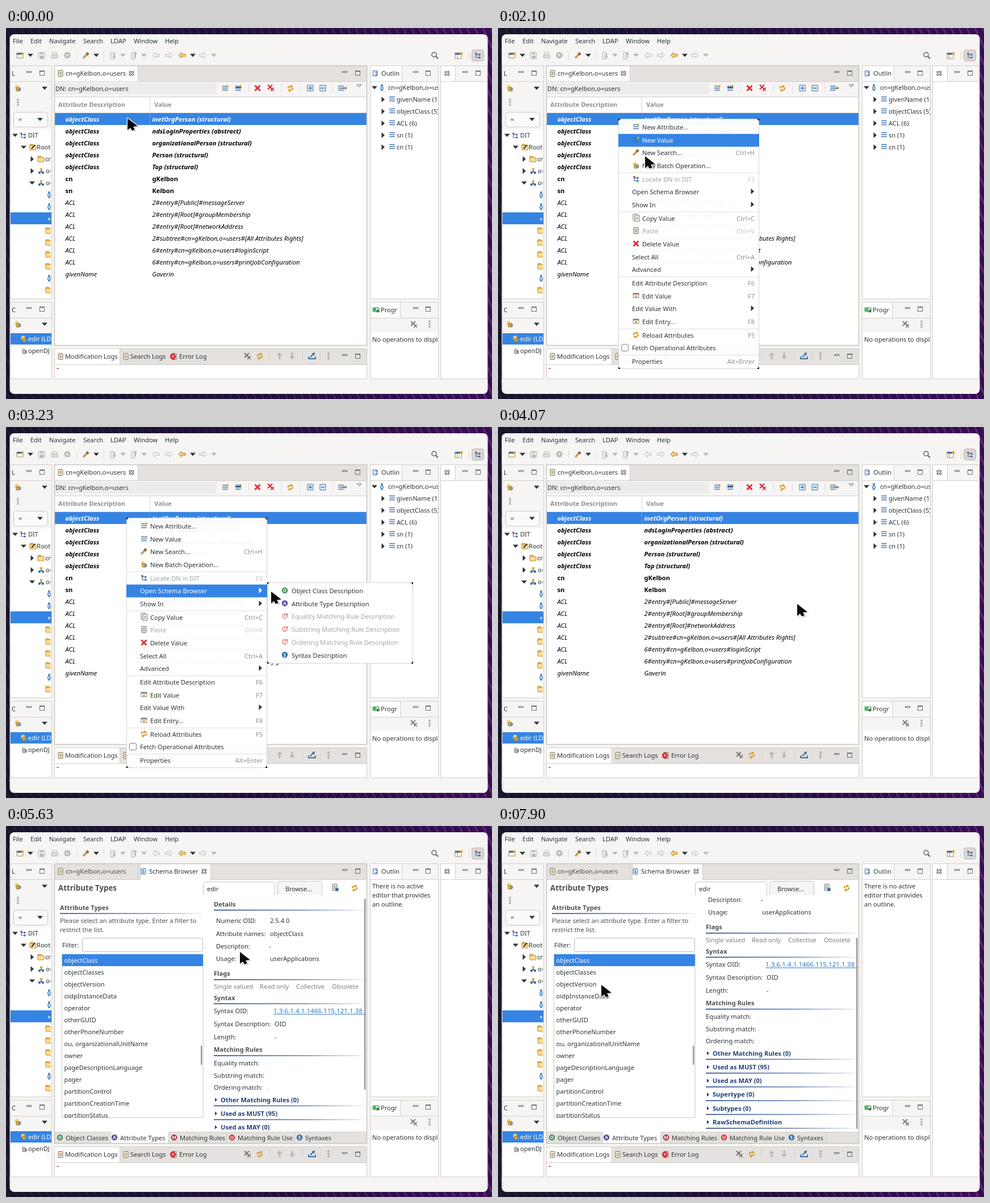
These frames come from a looping animation (856x654 px, 8 s). An HTML page with a canvas:

```html
<!DOCTYPE html>
<html lang="en">
<head>
<meta charset="utf-8">
<title>Directory browser</title>
<style>
html, body { margin: 0; width: 100%; height: 100%; overflow: hidden; background: #17102a; }
canvas { display: block; width: 856px; height: 654px; }
</style>
</head>
<body>
<canvas id="stage"></canvas>
<script>
const W = 856, H = 654, LOOP = 8000;
const cv = document.getElementById('stage'), g = cv.getContext('2d');
const dpr = window.devicePixelRatio || 1;
cv.width = W * dpr;
cv.height = H * dpr;

const INK = '#2e3436', DIM = '#a3a5a5', BLUE = '#3584e4', BG = '#f6f5f4', STRIP = '#e4e1de', LINE = '#d2cec9';
const NAVY = '#1f3f77', GOLD = '#e0a526', ICON = '#3a6ea5', RED = '#d9303c', GREY = '#b9b7b5';
const USER = 'Kelbon', DN = 'cn=g' + USER + ',o=users';

// ---- primitives ----
function rect(x, y, w, h, c) { g.fillStyle = c; g.fillRect(x, y, w, h); }
function frame(x, y, w, h, c = LINE, lw = 1) {
  g.strokeStyle = c; g.lineWidth = lw; g.strokeRect(x + .5, y + .5, w - 1, h - 1);
}
function box(x, y, w, h, r, fill, stroke) {
  g.beginPath(); g.roundRect(x, y, w, h, r);
  if (fill) { g.fillStyle = fill; g.fill(); }
  if (stroke) { g.strokeStyle = stroke; g.lineWidth = 1; g.stroke(); }
}
function path(p, x, y) {
  g.beginPath();
  for (let i = 0; i < p.length; i += 2) g.lineTo(x + p[i], y + p[i + 1]);
}
function poly(x, y, p, c) { path(p, x, y); g.closePath(); g.fillStyle = c; g.fill(); }
function line(x, y, p, c, lw = 1.2) { path(p, x, y); g.strokeStyle = c; g.lineWidth = lw; g.stroke(); }
function disc(x, y, r, c) { g.beginPath(); g.arc(x, y, r, 0, 7); g.fillStyle = c; g.fill(); }
function text(s, x, y, c = INK, style = '', size = 11.1) {
  g.font = `${style} ${size}px "Noto Sans", "Open Sans", sans-serif`;
  g.fillStyle = c;
  g.fillText(s, x, y + 4);
}
function textEnd(s, x, y, c) { g.textAlign = 'right'; text(s, x, y, c); g.textAlign = 'left'; }
function clip(x, y, w, h, draw) {
  g.save(); g.beginPath(); g.rect(x, y, w, h); g.clip(); draw(); g.restore();
}

// ---- icons, placed by their centre ----
const triR = (x, y, c = INK) => poly(x, y, [-2.5, -5, 3, 0, -2.5, 5], c);
const triD = (x, y, c = INK) => poly(x, y, [-5, -2.5, 5, -2.5, 0, 3], c);
const dots = (x, y) => { for (let i = -1; i < 2; i++) { disc(x, y + i * 4.5, 1.7, '#8b8987'); disc(x, y + i * 4.5, .8, '#fff'); } };
function minMax(x, y, x2) {
  frame(x - 4, y - 3, 9, 3, '#6d6f70');
  frame(x2 - 4, y - 4, 9, 9, '#6d6f70');
  rect(x2 - 4, y - 4, 9, 2, '#6d6f70');
}
function cross(x, y, c, r = 4.5, lw = 3) {
  line(x, y, [-r, -r, r, r], c, lw); line(x, y, [r, -r, -r, r], c, lw);
}
function closeX(x, y) { cross(x, y, '#4a4d4e', 3.6, 3.6); cross(x, y, '#fff', 3, 1.5); }
function crosses(x, y, c) { cross(x - 1, y - 1, c, 4, 2.3); cross(x + 3, y + 3, c, 2.8, 1.8); }
function folder(x, y) {
  box(x - 5, y - 5, 6, 4, 1, '#f0c060', '#c08a2a');
  box(x - 5, y - 3, 11, 8, 1, '#fbdc94', '#c08a2a');
}
function person(x, y) {
  box(x - 2.5, y - 2, 5, 6, 2, '#a9cdec', '#4a80b0');
  line(x, y, [-1, 3, -1, 6], '#4a80b0', 1.5); line(x, y, [1, 3, 1, 6], '#4a80b0', 1.5);
  disc(x, y - 4, 2, '#4a80b0');
}
function org(x, y) {
  line(x, y, [0, -2, 0, 1, -3, 3], INK); line(x, y, [0, 1, 3, 3], INK);
  disc(x, y - 3, 2.2, GOLD); disc(x - 3, y + 3, 2.2, ICON); disc(x + 3, y + 3, 2.2, ICON);
}
function bars(x, y, star) {
  for (let i = -1; i < 2; i++) rect(x - 5, y + i * 3.5 - .7, 10, 1.4, ICON);
  if (star) disc(x + 4, y - 3.5, 2, GOLD);
}
function refresh(x, y) {
  line(x, y, [-4, 1, -4, -2, 1, -3], '#c98e18', 1.7); poly(x, y, [0, -6, 5, -3, 0, 0], GOLD);
  line(x, y, [4, -1, 4, 2, -1, 4], '#c98e18', 1.7); poly(x, y, [0, 1, -5, 4, 0, 7], GOLD);
}
function arrow(x, y, d, c, fill) {
  const p = [-6 * d, 0, -1 * d, -5, -1 * d, -2, 6 * d, -2, 6 * d, 2, -1 * d, 2, -1 * d, 5];
  poly(x, y, p, fill); path(p, x, y); g.closePath(); g.strokeStyle = c; g.lineWidth = 1; g.stroke();
}
function torch(x, y) { line(x, y, [-5, 5, 2, -2], '#cf9848', 3.5); line(x, y, [1, -1, 4, -4], '#8b6b4a', 5); }
function badge(x, y, c, s) {
  disc(x, y, 5.2, c);
  g.textAlign = 'center'; text(s, x, y - .9, '#fff', 'bold', 8); g.textAlign = 'left';
}
function page(x, y, c = '#f3ead0') { box(x - 4, y - 5.5, 8, 11, 1, c, '#77715c'); for (let i = -2; i < 4; i += 2) line(x, y, [-2, i, 2, i], '#77715c', .8); }
function grid(x, y) { box(x - 5, y - 4, 10, 8, 0, '#fff', '#85807a'); rect(x - 5, y - 4, 10, 2.5, '#8a8580'); rect(x - 2, y, 4, 3, GOLD); }
function plusBox(x, y, plus) {
  box(x - 5, y - 5, 10, 10, 0, '#e4eefa', ICON); line(x, y, [-3, 0, 3, 0], ICON, 1.5);
  if (plus) line(x, y, [0, -3, 0, 3], ICON, 1.5);
}
function link(x, y) { disc(x - 2, y - 2, 3.5, '#f2ce72'); box(x - 3, y - 1, 7, 6, 1, '#e8b43c', '#8a6a20'); disc(x + 3, y + 2, 2.5, '#6b92bb'); }
function network(x, y, c = ICON) { disc(x - 3, y - 3, 1.8, RED); disc(x + 3, y - 1, 1.8, c); disc(x + 3, y + 4, 1.8, c); line(x, y, [-3, -3, -3, 4, 3, 4], c); line(x, y, [-3, -1, 3, -1], c); }

// ---- motion ----
// keys: [time, value...]; monotone cubic, so holds stay still
function track(keys, t, k = 1) {
  const n = keys.length;
  if (t <= keys[0][0]) return keys[0][k];
  if (t >= keys[n - 1][0]) return keys[n - 1][k];
  let i = 0;
  while (t >= keys[i + 1][0]) i++;
  const rate = j => j < 0 || j > n - 2 ? 0 : (keys[j + 1][k] - keys[j][k]) / (keys[j + 1][0] - keys[j][0]);
  const slope = j => { const a = rate(j - 1), b = rate(j); return a * b <= 0 ? 0 : 2 * a * b / (a + b); };
  const h = keys[i + 1][0] - keys[i][0], u = (t - keys[i][0]) / h, v = 1 - u;
  return keys[i][k] * (1 + 2 * u) * v * v + h * slope(i) * u * v * v
    + keys[i + 1][k] * u * u * (3 - 2 * u) - h * slope(i + 1) * u * u * v;
}
// last value whose time has come
function step(keys, t) {
  let v = keys[0][1];
  for (const [at, val] of keys) if (t >= at) v = val;
  return v;
}
const POINTER = [[1670, 214, 159], [2100, 259, 226], [2470, 313, 284], [2600, 313, 290], [3070, 313, 290],
  [3230, 467, 290], [3530, 527, 312], [4980, 527, 312], [5630, 412, 222], [5730, 324, 238], [6030, 296, 246],
  [6230, 296, 246], [6770, 508, 328], [7030, 508, 393], [7130, 508, 393], [7730, 182, 280]];
const SCROLL = [[6500, 0], [6770, 52], [6990, 82]];
const MENU_FADE = [[0, 0], [1130, .35], [1200, .75], [1270, 1], [3930, .65], [4000, .3], [4070, 0]];
const SUB_FADE = [[0, 0], [2500, .25], [2540, .5], [2590, .75], [2630, .97], [2770, 1], [3930, .65], [4000, .3], [4070, 0]];
const MENU_ROW = [[0, -1], [1800, 0], [1950, 1], [2115, 2], [2220, 3], [2370, 5]];
const SUB_ROW = [[0, -1], [3260, 0], [3400, 1]];
const BROWSER_AT = 4930;

// ---- window ----
function wallpaper() {
  const bg = g.createLinearGradient(0, 0, W, 0);
  bg.addColorStop(0, '#151428'); bg.addColorStop(.5, '#1e1038'); bg.addColorStop(1, '#340f50');
  rect(0, 0, W, H, bg);
  const ray = g.createLinearGradient(0, 0, W, 0);
  ray.addColorStop(0, '#211c36'); ray.addColorStop(.5, '#32184f'); ray.addColorStop(1, '#662080');
  for (let i = -30; i < 80; i++) line(i * 14, 0, [0, 0, 300, H], ray, 3);
}
function panel(x, y, w, h, tab, body, strip = BG) {
  rect(x, y, w, h, BG);
  rect(x, y, w, 28, strip);
  if (tab) rect(x, y, tab, 28, '#fff');
  if (tab) rect(x + tab, y, 1, 28, LINE);
  rect(x, body, w, y + h - body, '#fff');
  rect(x, y + 28, w, 1, LINE);
  frame(x, y, w, h);
}
function topBars() {
  [['File', 12], ['Edit', 43], ['Navigate', 76], ['Search', 136], ['LDAP', 184], ['Window', 225], ['Help', 280]]
    .forEach(([s, x]) => text(s, x, 23));
  box(19, 44, 11, 9, 1, '#fdf4d8', '#a08a55'); rect(19, 44, 11, 3, ICON); disc(29, 45, 2.2, GOLD);
  [43, 159].forEach(x => triD(x, 48));
  [206, 243, 366].forEach(x => triD(x, 48, GREY));
  triD(329, 48);
  box(57, 43, 11, 11, 1, '#eceae8', GREY); rect(60, 49, 6, 5, GREY); rect(60, 43, 5, 3, GREY);
  box(80, 47, 11, 6, 1, '#dedcda', GREY); box(82, 43, 7, 4, 0, '#f8f8f8', GREY);
  for (let a = 0; a < 8; a++) line(108, 48, [0, 0, 6 * Math.cos(a * .785), 6 * Math.sin(a * .785)], GREY, 2.5);
  disc(108, 48, 4, GREY); disc(108, 48, 2, BG);
  torch(141, 48);
  for (const [x, d] of [[188, 1], [225, -1]]) {
    box(x - 4, 43, 6, 12, 1, '#eceae8', GREY);
    line(x + 3, 48, [0, -4, 0, 4], GREY, 2); poly(x + 3, 48, [-3, 2 * d, 3, 2 * d, 0, 6 * d], GREY);
  }
  arrow(264, 48, 1, GREY, BG); arrow(287, 48, -1, GREY, BG);
  arrow(310, 48, 1, '#b98113', '#f7d27c'); arrow(347, 48, -1, GREY, BG);
  [124, 172, 815].forEach(x => rect(x, 41, 1, 15, '#dedad6'));
  g.beginPath(); g.arc(754, 47, 4, 0, 7); g.strokeStyle = '#5a5d5e'; g.lineWidth = 1.5; g.stroke();
  line(757, 50, [0, 0, 4, 4], '#5a5d5e', 2);
  box(791, 44, 11, 10, 0, '#fff', '#a08a55'); rect(791, 44, 11, 3, ICON); rect(795, 47, 1, 7, '#a08a55'); disc(802, 45, 2.5, GOLD);
  box(820.5, 38.5, 21, 20, 4, '#dad6d2', '#bfb8b1'); network(831, 48);
}
function leftSide() {
  panel(7, 66, 74, 412, 0, 179);
  text('L', 10, 80); minMax(40, 79, 63);
  link(21, 106); triD(68, 106); dots(21, 131);
  box(13.5, 148.5, 60, 26, 4, '#fbfafa', '#cdc7c2'); text('=', 22, 161); triD(60, 161);
  rect(8, 325, 72, 21, BLUE);
  clip(8, 179, 71, 297, () => {
    triD(16, 189); network(30, 189); text('DIT', 39, 189);
    triD(31, 210); folder(47, 210); line(47, 210, [-2, 3, 4, -4], INK, 2); text('Root', 54, 210);
    triR(46, 231); folder(61, 231); text('cn=', 69, 231);
    triR(46, 252); org(62, 252); text('o=', 70, 252);
    triD(46, 273); org(62, 273); text('o=', 70, 273);
    [294, 315, 336, 441].forEach(y => person(76, y));
    [357, 378, 399, 420, 462].forEach(y => folder(75, y));
  });
  panel(7, 483, 74, 136, 0, 536);
  text('C', 10, 497); minMax(40, 495, 63);
  link(21, 522); triD(68, 522);
  rect(8, 538, 72, 20, BLUE);
  clip(8, 536, 72, 80, () => {
    link(32, 548); text('edir (LDAP)', 39, 548, '#fff');
    disc(31, 567, 3, '#d5d3d0'); box(29, 568, 7, 6, 1, '#c5c3c0', '#77777a'); disc(35, 571, 2, '#8c8a88');
    text('openDJ', 39, 569);
  });
}
function rightSide(browsing) {
  panel(641, 66, 121, 412, 56, 95);
  box(646.5, 75.5, 7, 9, 0, '#eaf2fb', ICON); line(650, 80, [0, -2, 5, -2], ICON); line(650, 80, [0, 2, 5, 2], ICON);
  text('Outlin', 661, 80); minMax(721, 79, 743);
  if (browsing) {
    ['There is no active', 'editor that provides', 'an outline.'].forEach((s, i) => text(s, 645, 106 + i * 16));
  } else clip(642, 95, 119, 380, () => {
    triD(649, 105); person(662, 105); text(DN, 673, 105);
    ['givenName (1)', 'objectClass (5)', 'ACL (6)', 'sn (1)', 'cn (1)'].forEach((s, i) => {
      const y = 126 + i * 21;
      triR(664, y); bars(680, y - 1); text(s, 688, y);
    });
  });
  panel(765, 66, 83, 553, 26, 95);
  closeX(777, 80); minMax(808, 79, 831);
  panel(641, 483, 121, 136, 53, 536);
  box(646, 493, 11, 7, 1, '#d5efd8', '#2f8a46'); rect(647, 494, 5, 5, '#4cb265'); disc(655, 499, 2.5, '#3b7a4b');
  text('Progr', 660, 497); minMax(721, 495, 743);
  crosses(718, 522, '#85837f'); dots(746, 522);
  clip(642, 540, 119, 20, () => text('No operations to display', 645, 549));
}
function logs() {
  panel(85, 565, 551, 54, 115, 593, STRIP);
  page(96, 579); text('Modification Logs', 104, 579);
  page(211, 579); text('Search Logs', 219, 579);
  page(296, 579); badge(294, 579, RED, '×'); text('Error Log', 305, 579);
  crosses(425, 578, '#7d7b78'); refresh(447, 578);
  line(482, 578, [0, 6, 0, -3], GREY, 3); poly(482, 578, [-5, -1, 5, -1, 0, -6], GREY);
  line(504, 578, [0, -6, 0, 3], GREY, 3); poly(504, 578, [-5, 1, 5, 1, 0, 6], GREY);
  line(539, 578, [-6, 1, -6, 5, 6, 5, 6, 1], ICON, 1.8); line(539, 578, [-3, 2, 3, -4], ICON, 2); poly(539, 578, [0, -5, 5, -6, 4, 0], ICON);
  [464, 522, 553].forEach(x => rect(x, 571, 1, 14, '#d3cfcb'));
  dots(568, 578); minMax(596, 578, 619);
  text('-', 89, 600, RED, 'bold', 13);
}

// ---- entry editor ----
const ATTRS = [
  ...['inetOrgPerson (structural)', 'ndsLoginProperties (abstract)', 'organizationalPerson (structural)', 'Person (structural)', 'Top (structural)']
    .map(v => ['objectClass', v, 'italic bold']),
  ['cn', 'g' + USER, 'bold'], ['sn', USER, 'bold'],
  ...['2#entry#[Public]#messageServer', '2#entry#[Root]#groupMembership', '2#entry#[Root]#networkAddress',
    `2#subtree#${DN}#[All Attributes Rights]`, `6#entry#${DN}#loginScript`, `6#entry#${DN}#printJobConfiguration`]
    .map(v => ['ACL', v, 'italic']),
  ['givenName', 'Gaverin', 'italic']];
function entryEditor() {
  panel(85, 66, 551, 494, 147, 121, STRIP);
  page(96, 80); text(DN, 105, 80); closeX(221, 80);
  minMax(596, 79, 619);
  rect(86, 97, 285, 20, '#eeecea'); text('DN: ' + DN, 87, 107);
  bars(386, 106, 1); bars(409, 106, 1); rect(404, 104, 10, 2, '#1d4f8c');
  cross(443, 106, RED); crosses(466, 105, RED); refresh(501, 106);
  plusBox(536, 106, true); plusBox(558, 106);
  bars(590, 106); line(594, 106, [-2, 0, 5, 0], INK); poly(598, 106, [-1, -3, 3, 0, -1, 3], '#b07a2a');
  [427, 485, 518, 575].forEach(x => rect(x, 99, 1, 14, '#dedad6'));
  path([-4, -2, 4, -2, 0, 2], 622, 102); g.closePath(); g.strokeStyle = '#6d6f70'; g.lineWidth = 1; g.stroke();
  rect(86, 121, 549, 1, LINE); rect(86, 149, 549, 1, '#dedad6'); rect(253, 122, 1, 28, '#dedad6');
  text('Attribute Description', 92, 135, '#8d8f8f', 'bold'); text('Value', 261, 135, '#8d8f8f', 'bold');
  rect(86, 150, 549, 21, BLUE);
  rect(253, 150, 1, 21, '#5b9bea');
  ATTRS.forEach(([a, v, style], i) => {
    const y = 160.5 + i * 21, c = i ? '#000' : '#fff';
    text(a, 104.5, y, c, style); text(v, 257.5, y, c, style);
  });
  frame(85, 66, 551, 494, '#c9c4bf', 1.5);
}

// ---- schema browser ----
const TYPES = ['objectClass', 'objectClasses', 'objectVersion', 'oidpInstanceData', 'operator', 'otherGUID', 'otherPhoneNumber',
  'ou, organizationalUnitName', 'owner', 'pageDescriptionLanguage', 'pager', 'partitionControl', 'partitionCreationTime', 'partitionStatus'];
const PAGES = [['O', 'Object Classes', 95, '#3b8a55'], ['A', 'Attribute Types', 191, '#5a4a9c'], ['M', 'Matching Rules', 296, '#b02438'],
  ['U', 'Matching Rule Use', 398, '#d9303c'], ['S', 'Syntaxes', 517, '#2f6fae']];
function rule(x, y, w) {
  const c = g.createLinearGradient(x, 0, x + w, 0);
  c.addColorStop(0, '#24467f'); c.addColorStop(.6, '#6d88b5'); c.addColorStop(1, '#eef1f6');
  rect(x, y, w, 1.6, c);
}
function heading(s, x, y, w) { text(s, x, y, '#4c4f52', 'bold'); rule(x, y + 10, w); }
function details() {
  heading('Details', 366, 137.5, 265);
  [['Numeric OID:', 370, 167, '2.5.4.0', 465], ['Attribute names:', 370, 190, 'objectClass', 465], ['Descripton:', 370, 212, '-', 463],
    ['Usage:', 370, 234, 'userApplications', 465], ['Syntax OID:', 366, 326, '', 0], ['Syntax Description:', 366, 349, 'OID', 473],
    ['Length:', 366, 372, '-', 473]].forEach(([s, x, y, v, vx]) => { text(s, x, y); text(v, vx, y); });
  heading('Flags', 366, 260, 265);
  [['Single valued', 366], ['Read only', 447], ['Collective', 511], ['Obsolete', 574]].forEach(([s, x]) => text(s, x, 283, '#7d8081'));
  heading('Syntax', 366, 302.5, 265);
  text('1.3.6.1.4.1.1466.115.121.1.38', 471, 326, '#2a76c6', '', 11.6); rect(471, 331.5, 163, 1, '#2a76c6');
  heading('Matching Rules', 366, 394, 265);
  ['Equality', 'Substring', 'Ordering'].forEach((s, i) => {
    text(s + ' match:', 366, 418 + i * 21.7); text('-', 459, 418 + i * 21.7, '#c4c4c4');
  });
  ['Other Matching Rules (0)', 'Used as MUST (95)', 'Used as MAY (0)', 'Supertype (0)', 'Subtypes (0)', 'RawSchemaDefinition']
    .forEach((s, i) => {
      const y = 482.5 + i * 24.3;
      poly(369, y, [-1, -3.5, 3, 0, -1, 3.5], NAVY);
      text(s, 378, y, NAVY, 'bold'); rule(366, y + 10, 265);
    });
}
function schemaBrowser(scroll) {
  panel(85, 66, 551, 494, 0, 94, STRIP);
  rect(232, 67, 1, 27, LINE);
  page(96, 80); text(DN, 105, 80, '#4a4d4e');
  rect(237, 67, 123, 28, '#fff'); rect(236, 67, 1, 27, LINE); rect(360, 67, 1, 27, LINE);
  box(238, 75, 8, 10, 1, '#e8f0fa', ICON); text('S', 239.5, 79, ICON, 'bold', 8.5);
  text('Schema Browser', 252, 80); closeX(349, 80); minMax(596, 79, 619);

  text('Attribute Types', 92, 110, '#4c4f52', 'bold', 13.3);
  clip(340, 95, 294, 27, () => {
    box(347.5, 98.5, 126, 27, 4, '#fff', '#c8c2bc'); text('edir', 354, 111);
    box(478.5, 97.5, 78, 28, 4, BG, '#c8c2bc'); text('Browse...', 492, 111);
  });
  page(579, 108, '#dfeaf7'); disc(583, 112, 3, ICON); refresh(614, 109);

  heading('Attribute Types', 95, 143.5, 251);
  text('Please select an attribute type. Enter a filter to', 95, 167, '#4c4f52');
  text('restrict the list.', 95, 182.5, '#4c4f52');
  text('Filter:', 99, 209.5); box(134.5, 197.5, 212, 24, 3, '#fff', '#bfb8b1');
  frame(98, 226, 249.5, 288.5, '#cbc6c1');
  clip(98, 225, 250, 289, () => {
    rect(99, 226, 248, 21, BLUE);
    TYPES.forEach((s, i) => text(s, 102.5, 237 + i * 21, i ? INK : '#fff'));
  });
  box(343, 387, 2.5, 34, 1, '#9c9a98');

  clip(360, 125, 275, 413, () => {
    g.save(); g.translate(0, -scroll); details(); g.restore();
    box(631, 128 + scroll * 69 / 82, 2.5, 337, 1, '#98979a');
  });

  rect(86, 539, 549, 20, STRIP); rect(86, 539, 549, 1, LINE);
  rect(184, 539, 102, 20, '#fff');
  [184, 286, 388, 508, 578].forEach(x => rect(x, 540, 1, 19, LINE));
  PAGES.forEach(([k, s, x, c]) => { badge(x, 549, c, k); text(s, x + 10, 549.5); });
  frame(85, 66, 551, 494, '#c9c4bf', 1.5);
}

// ---- menus: [y, label, key or '>', icon, disabled] ----
const MENU = [
  [175, 'New Attribute...', '', (x, y) => bars(x, y, 1)], [198, 'New Value', '', (x, y) => bars(x, y, 1)],
  [220, 'New Search...', 'Ctrl+H', torch], [243, 'New Batch Operation...', '', link],
  [266.5, 'Locate DN in DIT', 'F3', network, 1], [289, 'Open Schema Browser', '>'], [312, 'Show In', '>'],
  [335.5, 'Copy Value', 'Ctrl+C', (x, y) => { page(x - 1, y - 1, '#fff'); page(x + 2, y + 1, '#fff'); }],
  [358, 'Paste', 'Ctrl+V', (x, y) => page(x, y, '#e5e3e0'), 1], [381, 'Delete Value', '', (x, y) => cross(x, y, RED)],
  [403.5, 'Select All', 'Ctrl+A'], [426, 'Advanced', '>'], [450, 'Edit Attribute Description', 'F6'],
  [472.5, 'Edit Value', 'F7', grid], [495, 'Edit Value With', '>'], [518, 'Edit Entry...', 'F8', grid],
  [541.5, 'Reload Attributes', 'F5', refresh], [564, 'Fetch Operational Attributes', ''], [587.5, 'Properties', 'Alt+Enter']];
const SUBMENU = [['Object Class', 'O', '#3b8a55'], ['Attribute Type', 'A', '#5a4a9c'], ['Equality Matching Rule', 'M'],
  ['Substring Matching Rule', 'M'], ['Ordering Matching Rule', 'M'], ['Syntax', 'S', '#2f6fae']];
function popup(x, y, w, h) {
  const k = 4;
  for (const cx of [x, x + w - k]) for (const cy of [y, y + h - k]) rect(cx, cy, k, k, '#000');
  box(x + .5, y + .5, w - 1, h - 1, 5, 'rgba(255,255,255,.965)', '#d8d4d0');
}
function menu(alpha, active) {
  g.globalAlpha = alpha;
  popup(212, 160, 248, 441);
  [254.5, 323.5, 438, 530, 576].forEach(y => rect(213, y, 246, 1, '#e3e0dd'));
  MENU.forEach(([y, s, key, icon, off], i) => {
    const on = i === active, c = on ? '#fff' : off ? DIM : INK;
    if (on) rect(212, y - 11.3, 248, 22.6, BLUE);
    if (icon) icon(243, y - 1);
    text(s, icon ? 254 : 236, y, c);
    if (key === '>') triR(448, y - 1, c);
    else textEnd(key, 452, y, off ? '#c4c5c5' : '#8d9091');
  });
  box(217.5, 557.5, 12, 12, 2.5, '#fff', '#85817d');
  g.globalAlpha = 1;
}
function submenu(alpha, active) {
  g.globalAlpha = alpha;
  popup(460, 274, 257, 143);
  SUBMENU.forEach(([s, k, c], i) => {
    const y = 289 + i * 22.7, on = i === active;
    if (on) rect(460, y - 11.3, 257, 22.6, BLUE);
    badge(491, y - 1, c || '#d9a5a5', k);
    if (!c) disc(495, y - 4, 1.8, '#d88');
    text(s + ' Description', 503, y, on ? '#fff' : c ? INK : DIM);
  });
  g.globalAlpha = 1;
}
function pointer(x, y) {
  const p = [0, 0, 0, 21, 5, 17, 8, 22, 13, 20, 10, 15, 18, 14];
  poly(x + 3, y + 2, p, 'rgba(0,0,0,.2)');
  path(p, x, y); g.closePath();
  g.lineJoin = 'round'; g.strokeStyle = '#fff'; g.lineWidth = 2.4; g.stroke();
  g.lineJoin = 'miter';
  poly(x, y, p, '#0b0b0b');
}

function draw(t) {
  g.setTransform(dpr, 0, 0, dpr, 0, 0);
  const browsing = t >= BROWSER_AT;
  wallpaper();
  box(6.5, 11, 842, 634, 8, BG);
  topBars();
  leftSide();
  rightSide(browsing);
  logs();
  for (let i = 0; i < 3; i++) rect(8, 626 + i * 4, 1, 2, '#c5c0bb');
  if (browsing) schemaBrowser(track(SCROLL, t)); else entryEditor();
  const main = step(MENU_FADE, t), sub = step(SUB_FADE, t);
  if (main) menu(main, step(MENU_ROW, t));
  if (sub) submenu(sub, step(SUB_ROW, t));
  pointer(track(POINTER, t, 1), track(POINTER, t, 2));
}
let start;
function tick(now) {
  start ??= now;
  draw((now - start) % LOOP);
  requestAnimationFrame(tick);
}
draw(0);
requestAnimationFrame(tick);
</script>
</body>
</html>
```
